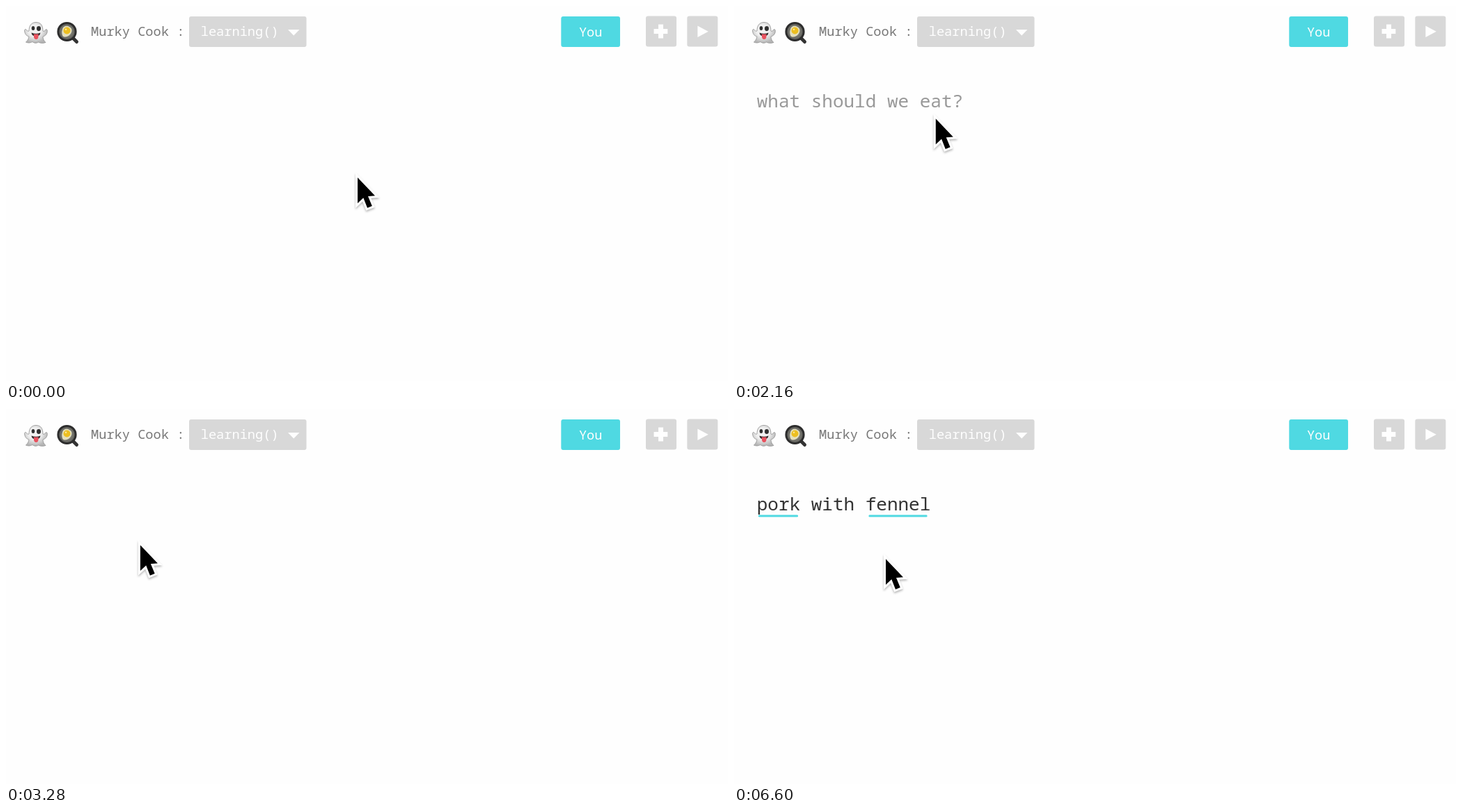
An HTML page for the animation above (7840 ms loop, 1037x540 px).

```html
<!DOCTYPE html>
<html lang="en">
<head>
<meta charset="utf-8">
<title>Recipe prompt</title>
<style>
  html, body { margin: 0; width: 100%; height: 100%; overflow: hidden; background: #fefefe; }
  svg { display: block; width: 1037px; height: 540px; }
  text { font-family: "Noto Sans Mono", monospace; white-space: pre; }
  .small { font-size: 18.67px; }
  .big { font-size: 26px; }
  .button { fill: #d8d8d8; }
  .accent { fill: #4fd9e2; }
  .icon { fill: #fefefe; }
  #cursor { filter: drop-shadow(0 2px 1.5px rgba(0, 0, 0, .28)); }
</style>
</head>
<body>
<svg viewBox="0 0 1037 540">
  <defs>
    <radialGradient id="sheet" cx=".45" cy=".4" r=".6">
      <stop offset=".45" stop-color="#f1f1f1"/>
      <stop offset="1" stop-color="#b4b4b4"/>
    </radialGradient>
    <radialGradient id="iron">
      <stop offset=".3" stop-color="#8b8b80"/>
      <stop offset="1" stop-color="#5b5b58"/>
    </radialGradient>
  </defs>

  <g id="ghost">
    <path d="M43 23.5C36 23.5 33 29 33 36C31 37 30 35 28.500 33.500C26.500 33 26 36 27.500 39.500C29 43 32 43.500 33 44C32.500 48 30 51 28.500 52C33 54 36 52.500 38 51.500C40 53.500 44 54 46.500 52C49 53.500 53 54 57 52.500C54.500 50.500 53 47 53 44C56 43 58 41.500 59 38.500C60 35 58.500 32.500 57 34C55.500 36 54.500 37 53 36C53 28 50 23.500 43 23.500Z" fill="url(#sheet)" stroke="#8e8e8e" stroke-width=".8"/>
    <ellipse cx="39" cy="32" rx="2.300" ry="3" fill="#303030"/>
    <ellipse cx="47" cy="32.500" rx="3" ry="3.400" fill="#303030"/>
    <path d="M36.500 38.500Q43 41 49.500 38.500Q49 43.500 43 43.500Q37 43.500 36.500 38.500Z" fill="#352c2e"/>
    <path d="M40 40.500H46.500V44.500Q46 48 43.200 48Q40.500 48 40 44.500Z" fill="#e8525f"/>
  </g>

  <g id="pan">
    <path d="M95 45L101.500 51.500" stroke="#333" stroke-width="5" stroke-linecap="round"/>
    <circle cx="87.500" cy="37" r="12.600" fill="url(#iron)" stroke="#2d2d2d" stroke-width="3"/>
    <path d="M81 34C82 28 88 28 91 30C96 32 95 38 92 41C89 45 82 46 81 42C80 39 80 37 81 34Z" fill="#e5e0bd"/>
    <circle cx="87.500" cy="35.500" r="5" fill="#edbf20"/>
    <circle cx="86" cy="33.800" r="1.300" fill="#fbe89a"/>
  </g>

  <text class="small" x="122" y="43.300" fill="#777">Murky Cook :</text>
  <rect class="button" x="263" y="15" width="168.500" height="44" rx="3"/>
  <text class="small icon" x="279.700" y="43.300">learning()</text>
  <path class="icon" d="M405 34H421.500L413.200 42.500Z"/>

  <rect class="accent" x="797.300" y="15" width="84.700" height="44" rx="3"/>
  <text class="small icon" x="839.700" y="44" text-anchor="middle" font-weight="500">You</text>

  <rect class="button" x="919" y="14.500" width="44" height="44" rx="3"/>
  <path class="icon" d="M937 26.500H944V33H950.300V40H944V46.500H937V40H930.500V33H937Z"/>
  <rect class="button" x="978.300" y="14.500" width="44" height="44" rx="3"/>
  <path class="icon" d="M993.300 28.500L1008.700 36.700L993.300 45Z"/>

  <text id="question" class="big" x="32.700" y="146" fill="#999"></text>
  <text id="answer" class="big" x="32.700" y="146" fill="#333"></text>
  <rect id="line1" class="accent" x="35" y="152.500" height="3" rx="1.200"/>
  <rect id="line2" class="accent" x="193.500" y="152.500" height="3" rx="1.200"/>

  <path id="cursor" d="M0 0V37L8.300 29.300L14 43.700L20.800 41L15 27L25 26.200Z"
        fill="#000" stroke="#fff" stroke-width="6" paint-order="stroke" stroke-miterlimit="8"/>
</svg>

<script>
  const LOOP = 7840, TICK = 40;
  const [question, answer, line1, line2, cursor] =
    ["question", "answer", "line1", "line2", "cursor"].map(id => document.getElementById(id));

  const progress = (t, from, to) => Math.min(1, Math.max(0, (t - from) / (to - from)));
  const easeInOut = p => p < .5 ? 2 * p * p : 1 - 2 * (1 - p) ** 2;
  const typed = (text, t, start, interval) =>
    text.slice(0, Math.max(0, Math.floor((t - start) / interval) + 1));

  function setText(node, text) {
    if (node.textContent !== text) node.textContent = text;
  }

  function cursorAt(t) {
    const approach = progress(t, 1680, 2320);
    const leave = progress(t, 2960, 3440);
    return [
      505 - 287 * approach - 29 * Math.sin(Math.PI * leave),
      247 - 113 * approach + 82 * leave * (1.4 - .4 * leave)
    ];
  }

  function draw(t) {
    const fade = easeInOut(progress(t, 2320, 2920));
    setText(question, fade < 1 ? typed("what should we eat?", t, 640, 76) : "");
    question.style.opacity = 1 - fade;
    question.style.filter = fade > 0 ? `blur(${2.5 * fade}px)` : "none";

    setText(answer, typed("pork with fennel", t, 3870, 130));
    line1.setAttribute("width", 57 * progress(t, 4500, 4880));
    line2.setAttribute("width", 84 * progress(t, 6240, 6600));

    cursor.setAttribute("transform", `translate(${cursorAt(t)})`);
  }

  const begin = performance.now();
  function frame() {
    const t = (performance.now() - begin) % LOOP;
    draw(Math.floor(t / TICK) * TICK);
    requestAnimationFrame(frame);
  }
  frame();
</script>
</body>
</html>
```
